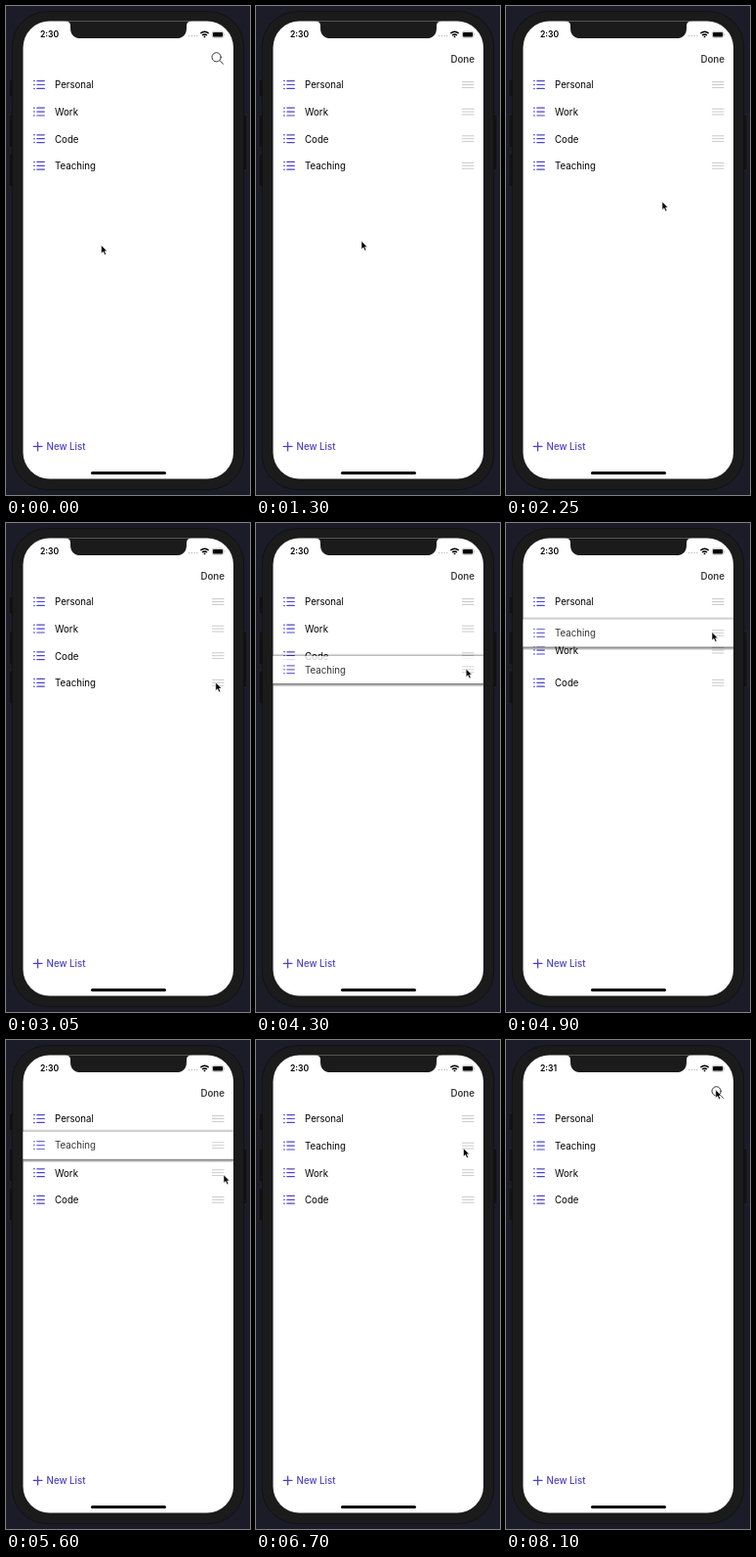
These frames come from a looping animation (250x500 px, 8650 ms). An HTML page:

```html
<!DOCTYPE html>
<html lang="en">
<head>
<meta charset="utf-8">
<title>Reorder lists</title>
<style>
html, body { margin: 0; width: 100%; height: 100%; overflow: hidden; background: #1c1b28; }
svg { display: block; width: 100%; height: 100%; }
text { font: 400 9.7px Inter, sans-serif; fill: #000; }
.accent { fill: #4a40c4; font-weight: 500; }
.done { fill: #3c3c3c; font-weight: 600; text-anchor: end; }
.clock { font-size: 8.6px; font-weight: 600; }
.line { fill: none; stroke-linecap: round; }
</style>
</head>
<body>
<svg viewBox="0 0 250 500" xmlns="http://www.w3.org/2000/svg">
  <defs>
    <clipPath id="screen"><rect x="17.5" y="15.5" width="215.5" height="468" rx="27"/></clipPath>
    <linearGradient id="under" x2="0" y2="1">
      <stop offset="0" stop-color="#000" stop-opacity=".75"/>
      <stop offset=".45" stop-color="#000" stop-opacity=".4"/>
      <stop offset="1" stop-color="#000" stop-opacity="0"/>
    </linearGradient>
    <linearGradient id="over" x2="0" y2="1">
      <stop offset="0" stop-color="#000" stop-opacity="0"/>
      <stop offset="1" stop-color="#000" stop-opacity=".4"/>
    </linearGradient>
    <g id="list" class="line" stroke="#4e45c6" stroke-width="1.2">
      <path d="M31.8 -3.9H39.3M31.8 0H39.3M31.8 3.9H39.3"/>
      <path d="M28.8 -3.9h.2M28.8 0h.2M28.8 3.9h.2" stroke-width="1.5"/>
    </g>
    <path id="grip" class="line" d="M211.3 -2.9H223M211.3 0H223M211.3 2.9H223" stroke="#c9c9c9"/>
  </defs>

  <rect width="250" height="500" fill="#1c1b28"/>
  <g fill="#121214" stroke="#2c2c31" stroke-width=".6">
    <rect x="3" y="75" width="6" height="18" rx="1"/>
    <rect x="3" y="111" width="6" height="34" rx="1"/>
    <rect x="3" y="151" width="6" height="34" rx="1"/>
    <rect x="241" y="111" width="6" height="57" rx="1"/>
  </g>
  <rect x="6.3" y="5.7" width="237.4" height="488.8" rx="36" fill="#1b1b1b" stroke="#111114"/>

  <g clip-path="url(#screen)">
    <rect x="17" y="15" width="216" height="470" fill="#fff"/>
    <g id="rows"></g>
    <g id="search" class="line" stroke="#333" stroke-width="1">
      <circle cx="215.6" cy="52.3" r="4.6"/>
      <path d="M219 55.7L222.6 59.4"/>
    </g>
    <text id="done" class="done" x="224" y="57.8">Done</text>
    <path class="line" d="M32.6 446v8.8M28.2 450.4H37" stroke="#4a40c4" stroke-width="1.2"/>
    <text class="accent" x="41.6" y="453.9">New List</text>
    <rect x="87" y="476" width="77" height="3" rx="1.5"/>

    <path d="M60 15C64 15.5 66 17 66 20.5V22.2Q66 33 76.8 33H174.2Q185 33 185 22.2V20.5C185 17 187 15.5 191 15Z" fill="#1b1b1b"/>
    <text id="clock" class="clock" x="35" y="32.2"></text>
    <path class="line" d="M187.7 30.6h.01M190.4 30.6h.01M193.1 30.6h.01M195.8 30.6h.01" stroke="#aaa" stroke-width="1.4"/>
    <g fill="none" stroke="#000" stroke-width="1.4">
      <path d="M199.3 28Q203.5 24.4 207.7 28M201 30Q203.5 27.8 206 30"/>
      <path d="M202.2 31L203.5 32.6L204.8 31Q203.5 30 202.2 31Z" fill="#000" stroke="none"/>
    </g>
    <rect x="211.3" y="26.2" width="11.4" height="6" rx="1.7" fill="none" stroke="#888" stroke-width=".6"/>
    <rect x="212" y="26.9" width="10" height="4.6" rx="1.1"/>
    <path d="M223.4 28.2Q224.6 29.2 223.4 30.2Z" fill="#888"/>
  </g>
  <path id="cursor" d="M0 0V8.5L2 6.7L3.5 9.9L5 9.2L3.6 6.1H6.1Z" fill="#000" stroke="#fff" stroke-width=".6" stroke-linejoin="round"/>
</svg>
<script>
const LOOP = 8650, STEP = 50, TOP = 80.5, PITCH = 27.6;
const LIFT = 3950, DROP = 5650;
const $ = id => document.getElementById(id);
const slot = i => TOP + i * PITCH;
const clamp = v => Math.max(0, Math.min(1, v));
const ease = (t, start, len) => 1 - (1 - clamp((t - start) / len)) ** 2.3;

// time, x, y of the pointer tip
const path = [
  [0, 97.6, 244.6], [900, 97.6, 244.6], [1300, 108, 240.3], [1830, 108, 240.3],
  [2250, 160, 200], [2700, 208, 164], [3050, 214.8, 163], [3900, 214.8, 163],
  [4300, 215.2, 149], [4750, 212, 120.5], [4900, 211, 111.6], [5300, 211.5, 106.8],
  [5550, 211.5, 106.8], [5600, 223, 137.8], [5950, 224, 194], [6150, 221, 192],
  [6450, 215, 150], [6850, 212, 90], [7250, 213, 52], [7750, 213, 52],
  [8100, 214.8, 50.8], [LOOP, 214.8, 50.8]
];

// monotone cubic interpolation along one axis
function slope(i, axis) {
  const a = path[i - 1], b = path[i], c = path[i + 1];
  if (!a || !c) return 0;
  const l = (b[axis] - a[axis]) / (b[0] - a[0]);
  const r = (c[axis] - b[axis]) / (c[0] - b[0]);
  return l * r > 0 ? 2 * l * r / (l + r) : 0;
}
function pointer(t, axis) {
  const i = Math.max(0, path.findIndex(k => k[0] > t) - 1);
  const a = path[i], b = path[i + 1], h = b[0] - a[0], u = (t - a[0]) / h;
  const d = b[axis] - a[axis], s = u * u * (3 - 2 * u);
  return a[axis] + d * s + h * u * (1 - u) * ((1 - u) * slope(i, axis) - u * slope(i + 1, axis));
}

const rows = ["Personal", "Work", "Code", "Teaching"].map(name => {
  const g = document.createElementNS("http://www.w3.org/2000/svg", "g");
  g.innerHTML = `<g class="shade">
      <rect x="17" y="14" width="216" height="4" fill="url(#under)"/>
      <rect x="17" y="-16.6" width="216" height="2.8" fill="url(#over)"/>
      <rect x="17" y="-13.8" width="216" height="27.8" fill="#fff"/>
    </g>
    <use href="#list"/><text x="50" y="3.85">${name}</text><use class="grip" href="#grip"/>`;
  $("rows").append(g);
  return { g, shade: g.querySelector(".shade"), grip: g.querySelector(".grip") };
});

function rowY(i, t) {
  if (i === 1) return slot(1 + ease(t, 4750, 300));
  if (i === 2) return slot(2 + ease(t, 4300, 300));
  if (i === 0 || t < LIFT) return slot(i);
  return t < DROP ? slot(3) + pointer(Math.min(t, 5550), 2) - 162.5 : slot(1);
}

function draw(t) {
  const edit = ease(t, 950, 300) - ease(t, 7450, 300);
  rows.forEach(({ g, shade, grip }, i) => {
    const held = i === 3 && t >= LIFT && t < DROP;
    g.setAttribute("transform", `translate(0 ${rowY(i, t)})`);
    g.setAttribute("opacity", held ? .8 : 1);
    shade.setAttribute("visibility", held ? "visible" : "hidden");
    grip.setAttribute("opacity", edit);
    grip.setAttribute("transform", `translate(${8 * (1 - edit)} 0)`);
  });
  $("done").setAttribute("opacity", edit);
  $("search").setAttribute("opacity", 1 - edit);
  $("clock").textContent = t < 7950 ? "2:30" : "2:31";
  $("cursor").setAttribute("transform", `translate(${pointer(t, 1)} ${pointer(t, 2)})`);
}

const begin = performance.now();
function tick() {
  const t = (performance.now() - begin) % LOOP;
  draw(Math.floor(t / STEP) * STEP);
  requestAnimationFrame(tick);
}
tick();
</script>
</body>
</html>
```
